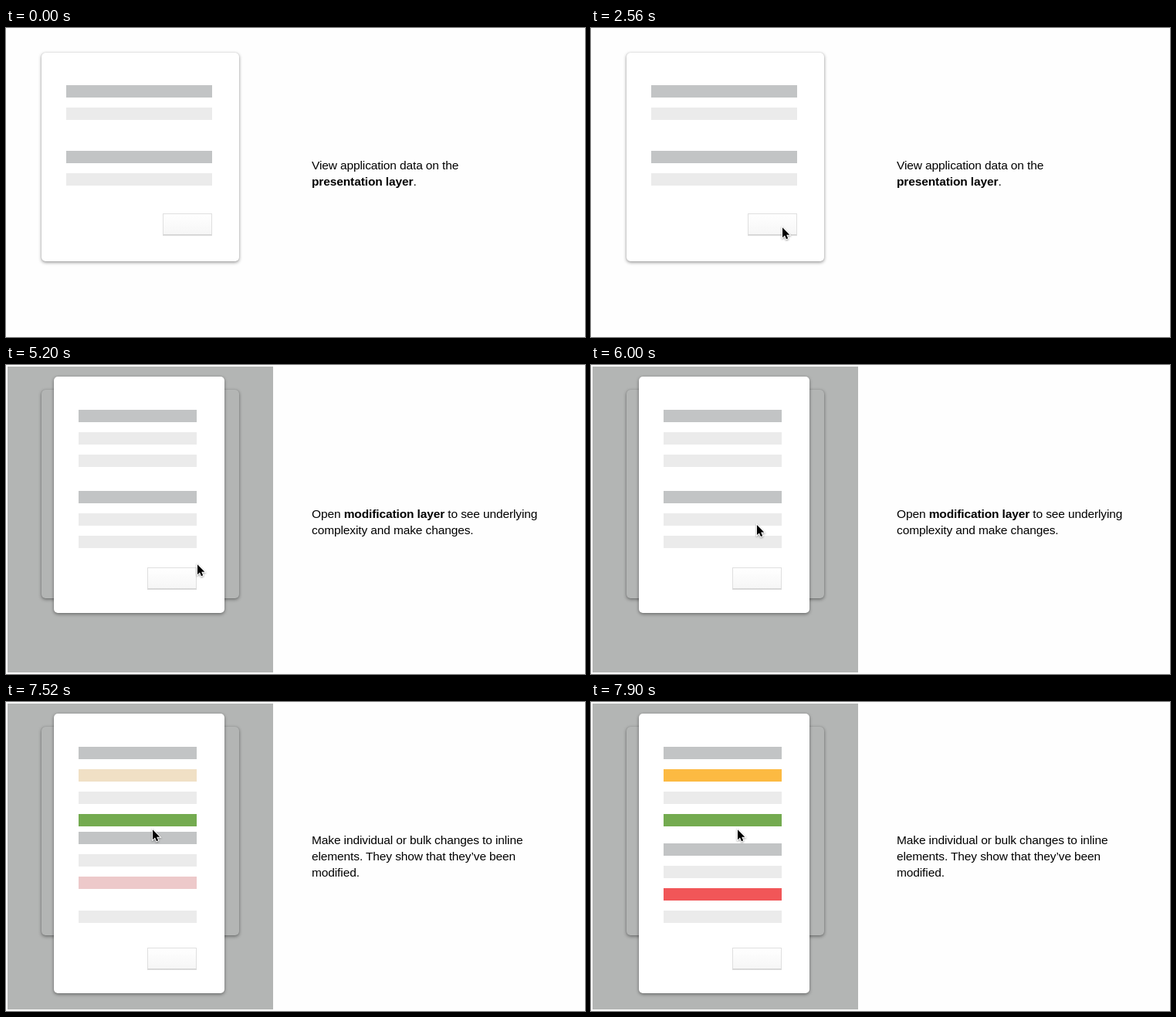
These frames come from a looping animation (750 by 400 pixels, 8000 ms). An HTML page:

```html
<!DOCTYPE html>
<html lang="en">
<head>
<meta charset="utf-8">
<title>Layers</title>
<style>
  html, body { margin: 0; width: 100%; height: 100%; overflow: hidden; background: #fefefe; }
  #stage { position: relative; width: 750px; height: 400px; overflow: hidden; }
  #stage div, #stage p, #cursor { position: absolute; margin: 0; box-sizing: border-box; }
  .card { background: #fff; border-radius: 5px;
    box-shadow: 0 1.5px 4px rgba(0,0,0,.42), 0 0 1px rgba(0,0,0,.22); }
  #base { left: 46px; top: 32px; width: 256px; height: 270px; }
  #base.dim { background: #b3b5b4; }
  #base.dim > * { visibility: hidden; }
  #backdrop { left: 2px; top: 2px; width: 344px; height: 396px; background: #b3b5b4; }
  #front { left: 62px; top: 15px; width: 221px; }
  .bar { left: 32px; height: 16px; background: #ebebeb; }
  #base .bar { width: 189px; }
  #front .bar { width: 153px; }
  .bar.head { background: #c2c4c5; }
  .tint { inset: 0; }
  .button { width: 64px; height: 28px; border: 1px solid #dfdfdf; border-bottom-color: #d4d4d4;
    background: linear-gradient(#fff, #f6f6f6); box-shadow: 0 1px #dcdcdc; }
  p { left: 396px; white-space: nowrap; color: #000; letter-spacing: -.12px;
    font: 15.5px/21px "Liberation Sans", Arial, sans-serif; }
  #cursor { left: 0; top: 0; overflow: visible; filter: drop-shadow(0 1px 1px rgba(0,0,0,.4)); }
</style>
</head>
<body>
<div id="stage">
  <div id="backdrop"></div>
  <div id="base" class="card"></div>
  <div id="front" class="card"></div>
  <p style="top:167px">View application data on the<br><b>presentation layer</b>.</p>
  <p style="top:182px">Open <b>modification layer</b> to see underlying<br>complexity and make changes.</p>
  <p style="top:168px">Make individual or bulk changes to inline<br>elements. They show that they’ve been<br>modified.</p>
  <svg id="cursor" width="14" height="20">
    <path d="M1 2.2V15.2L4 12.5L6 17.2L8.2 16.3L6.2 11.7H10.3Z"
      stroke="#fff" stroke-width="1.9" paint-order="stroke"/>
  </svg>
</div>
<script>
const LOOP = 8000, ENTER = 1320, OPEN = 3620, EDIT = 7410, DONE = 7900;
const $ = id => document.getElementById(id);
const base = $('base'), front = $('front'), backdrop = $('backdrop'), cursor = $('cursor');
const texts = document.querySelectorAll('p');

function add(parent, cls, style) {
  const el = document.createElement('div');
  el.className = cls;
  Object.assign(el.style, style);
  return parent.appendChild(el);
}
const bar = (card, top, head) => add(card, head ? 'bar head' : 'bar', { top: top + 'px' });
const tint = (el, color) => add(el, 'tint', { background: color });
const show = (el, on) => { el.style.visibility = on ? 'visible' : 'hidden'; };

[42, 71, 127, 156].forEach((y, i) => bar(base, y, i % 2 === 0));
add(base, 'button', { left: '157px', top: '208px' });

bar(front, 43, true);
const changed = tint(bar(front, 72), '#fcba42');
bar(front, 101);
const added = bar(front, 130);
added.style.background = '#74ab50';
const group = [148, 177, 206].map((y, i) => bar(front, y, i === 0));
const removed = tint(group[2], '#f15658');
const extra = bar(front, 255);
const button = add(front, 'button', { left: '121px' });

// time, x, y, x speed, y speed (px per ms)
const path = [
  [5200, 247, 256, 0, 0],
  [6000, 214, 205, -.055, -.12],
  [6450, 195, 135, -.03, 0],
  [6780, 190, 144, -.006, .07],
  [7010, 189, 163, 0, 0]
];

function hermite(a, b, va, vb, span, u) {
  const w = u * u * (3 - 2 * u);
  return a + (b - a) * w + span * u * (1 - u) * (va * (1 - u) - vb * u);
}

function pointer(t) {
  if (t < path[0][0]) {
    const u = Math.min(1, Math.max(0, (t - ENTER) / 1240));
    const p = 1 - (1 - u) ** 2.5;
    return [257 - 10 * p ** 3.8, 400 - 144 * p];
  }
  const i = path.findIndex(k => k[0] > t);
  if (i < 0) return path[path.length - 1].slice(1, 3);
  const a = path[i - 1], b = path[i], span = b[0] - a[0], u = (t - a[0]) / span;
  return [1, 2].map(n => hermite(a[n], b[n], a[n + 2], b[n + 2], span, u));
}

function draw(t) {
  const open = t >= OPEN, edit = t >= EDIT;
  const p = Math.min(1, Math.max(0, (t - EDIT) / (DONE - EDIT)));

  show(backdrop, open);
  base.classList.toggle('dim', open);
  front.style.display = open ? 'block' : 'none';
  front.style.height = (edit ? 362 : 306) + 'px';
  button.style.top = (edit ? 303 : 247) + 'px';
  [added, extra].forEach(el => { el.style.display = edit ? 'block' : 'none'; });
  [changed, removed].forEach(el => { el.style.opacity = p; });
  group.forEach((el, i) => { el.style.top = 148 + 29 * i + Math.round(20 * p) + 'px'; });

  const step = edit ? 2 : open ? 1 : 0;
  texts.forEach((el, i) => show(el, i === step));

  const [x, y] = pointer(t);
  show(cursor, t >= ENTER);
  cursor.style.transform = `translate(${x}px, ${y}px)`;
}

function tick() {
  draw(performance.now() % LOOP);
  requestAnimationFrame(tick);
}
tick();
</script>
</body>
</html>
```
